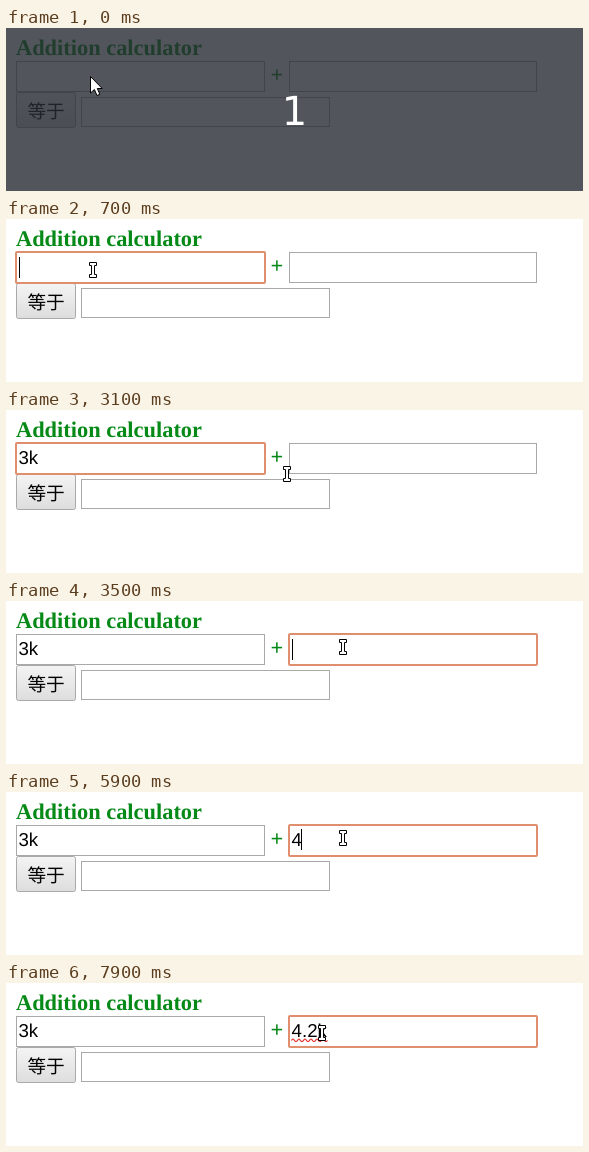
An HTML page that plays this animation: 577 by 163 pixels, repeating every 8 s.

```html
<!DOCTYPE html>
<html lang="en">
<head>
<meta charset="utf-8">
<title>Addition calculator</title>
<style>
  html, body { margin: 0; width: 100%; height: 100%; overflow: hidden; background: #fff; }
  svg { display: block; width: 577px; height: 163px; }
  text { text-rendering: geometricPrecision; white-space: pre; }
  .title { font: bold 22.4px "Liberation Serif", "Times New Roman", serif; fill: #068a17; }
  .value { font: 18.67px "Liberation Sans", Arial, sans-serif; fill: #000; }
  .label { font: 18.67px "Noto Sans CJK SC", "Noto Sans CJK", sans-serif; fill: #000; }
  .count { font: 40px "DejaVu Sans", sans-serif; fill: #fff; text-anchor: middle; }
  .field { fill: #fff; stroke: #a9a9a9; }
  .wave { fill: none; stroke: #e0201b; stroke-width: 1.2; }
  .pointer { fill: #fff; stroke: #000; }
</style>
</head>
<body>
<svg viewBox="0 0 577 163">
  <defs>
    <linearGradient id="face" x2="0" y2="1">
      <stop offset="0" stop-color="#f4f4f4"/>
      <stop offset="1" stop-color="#dddddd"/>
    </linearGradient>
  </defs>
  <rect width="577" height="163" fill="#fff"/>
  <text class="title" x="10" y="27">Addition calculator</text>
  <rect class="field" x="10.5" y="33.5" width="248" height="30"/>
  <text class="title" x="264.6" y="54">+</text>
  <rect class="field" x="283.5" y="33.5" width="247" height="30"/>
  <rect x="10.5" y="64.5" width="59" height="35" rx="2" fill="url(#face)" stroke="#a9a9a9"/>
  <text class="label" x="21.4" y="90">等于</text>
  <rect class="field" x="75.5" y="69.5" width="248" height="29"/>
  <rect id="ring" y="33" height="31" rx="1" fill="none" stroke="#e08f6e" stroke-width="2"/>
  <text class="value" id="first" x="12.4" y="54"></text>
  <text class="value" id="second" x="285.6" y="54"></text>
  <path class="wave" id="wave1"/>
  <path class="wave" id="wave2"/>
  <rect id="caret" width="1" height="21"/>
  <g id="shade">
    <rect width="577" height="163" fill="rgb(39,43,51)" fill-opacity=".8"/>
    <text class="count" x="288.5" y="97">1</text>
  </g>
  <path class="pointer" id="arrow" d="M0 0V16.5L3.9 13 6.5 19 9.3 17.8 6.8 12H11.7Z"/>
  <path class="pointer" id="beam" d="M-3.5-7.5h7v3h-2v9h2v3h-7v-3h2v-9h-2z"/>
</svg>
<script>
const LOOP = 8000;
const $ = id => document.getElementById(id);

// Each track lists [start ms, value]; a value holds until the next start.
const tracks = {
  shade: [[0, true], [400, false]],
  focus: [[0, 0], [600, 1], [3500, 2]],
  first: [[0, ""], [2000, "3"], [2200, "3k"]],
  second: [[0, ""], [4400, "4"], [4700, "4."], [5300, "4"], [5400, "4."],
           [5900, "4"], [6000, "4."], [6300, "4.2"], [6800, "4.2k"]],
  caret: [[0, false], [600, true], [1200, false], [1800, true], [2800, false],
          [3500, true], [7500, false]],
  wave1: [[0, false], [3200, true], [3500, false]],
  wave2: [[0, false], [7900, true]],
  pointer: [[0, ["arrow", 84.5, 48.5]], [400, ["beam", 87, 51]], [3100, ["beam", 281, 64]],
            [3200, ["arrow", 333.5, 62]], [3400, ["beam", 337, 46]], [7900, ["beam", 316, 50]]]
};
const fields = {
  1: { key: "first", ring: [10, 249], text: 12.4, start: 13 },
  2: { key: "second", ring: [283, 248], text: 285.6, start: 286 }
};
const advance = { "3": 10.38, "4": 10.38, "2": 10.38, ".": 5.19, k: 9.33 };

const at = (track, t) => track.filter(step => step[0] <= t).pop()[1];
const show = (el, on) => el.setAttribute("visibility", on ? "visible" : "hidden");
const textWidth = s => [...s].reduce((sum, c) => sum + advance[c], 0);

function squiggle(x, end) {
  let d = `M${x} 57.5`;
  for (let i = 0; x + i * 3 < end; i++) d += `q1.5 ${i % 2 ? 2 : -3} 3 0`;
  return d;
}

function draw(t) {
  const now = {};
  for (const key in tracks) now[key] = at(tracks[key], t);

  for (const key of ["first", "second"]) {
    if ($(key).textContent !== now[key]) $(key).textContent = now[key];
  }
  for (const key of ["shade", "wave1", "wave2"]) show($(key), now[key]);

  const field = fields[now.focus];
  show($("ring"), field);
  show($("caret"), field && now.caret);
  if (field) {
    const value = now[field.key];
    $("ring").setAttribute("x", field.ring[0]);
    $("ring").setAttribute("width", field.ring[1]);
    $("caret").setAttribute("x", value ? Math.floor(field.text + textWidth(value)) : field.start);
    $("caret").setAttribute("y", value ? 37 : 38);
  }

  const [kind, x, y] = now.pointer;
  for (const id of ["arrow", "beam"]) show($(id), id === kind);
  $(kind).setAttribute("transform", `translate(${x} ${y})`);
}

$("wave1").setAttribute("d", squiggle(12.5, 32));
$("wave2").setAttribute("d", squiggle(285.5, 320));

const began = performance.now();
function tick() {
  draw((performance.now() - began) % LOOP);
  requestAnimationFrame(tick);
}
tick();
</script>
</body>
</html>
```
